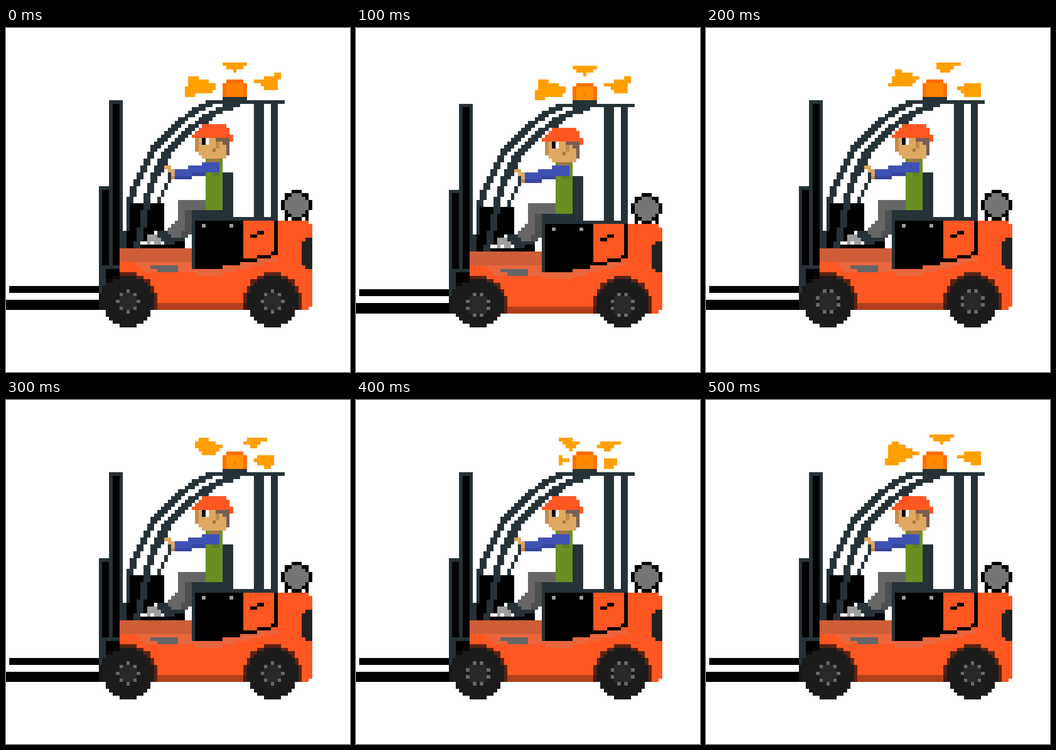
These frames come from a looping animation (748 by 748 pixels, 0.6 s). An HTML page with a canvas:

```html
<!DOCTYPE html>
<html lang="en">
<head>
<meta charset="utf-8">
<title>Forklift</title>
<style>
html, body { margin: 0; width: 100%; height: 100%; overflow: hidden; background: #fff; }
canvas { display: block; width: 100vw; height: 100vh; image-rendering: pixelated; }
</style>
</head>
<body>
<canvas id="stage" width="100" height="100"></canvas>
<script>
const ctx = document.getElementById('stage').getContext('2d');
const STEP = 100;
const SLATE = '#263238', BLACK = '#000', ORANGE = '#ff5722', SOFT = '#e9663d',
      SKIN = '#dfa862', SHADE = '#c08c4c', HAIR = '#795f50', BLUE = '#3f51b5',
      NAVY = '#36459c', GREY = '#666', DARK = '#4f4f4f', STEEL = '#9e9e9e',
      LAMP = '#ff6d00', GLOW = '#ffa000';
const AXLES = [35.5, 77.5], AXLE_Y = 79.5, TYRE = 7.5, GROUND = 82;

// Box given by its edges in grid cells.
function box(color, x0, y0, x1, y1) {
  ctx.fillStyle = color;
  ctx.fillRect(x0, y0, x1 - x0, y1 - y0);
}

// Polygon without smoothing: fills the cells whose centres lie inside.
function poly(color, ...p) {
  const n = p.length;
  for (let y = 0; y < 100; y++) {
    const cuts = [], mid = y + 0.5;
    for (let i = 0; i < n; i += 2) {
      const [xa, ya, xb, yb] = [p[i], p[i + 1], p[(i + 2) % n], p[(i + 3) % n]];
      if ((ya <= mid) !== (yb <= mid)) cuts.push(xa + (xb - xa) * (mid - ya) / (yb - ya));
    }
    cuts.sort((a, b) => a - b);
    for (let i = 0; i + 1 < cuts.length; i += 2) {
      box(color, Math.ceil(cuts[i] - 0.5), y, Math.ceil(cuts[i + 1] - 0.5), y + 1);
    }
  }
}

function disc(color, cx, cy, rx, ry = rx, yMax = 100) {
  for (let y = Math.floor(cy - ry); y < Math.min(cy + ry, yMax); y++) {
    const d = (y + 0.5 - cy) / ry;
    if (Math.abs(d) >= 1) continue;
    const half = Math.floor(rx * Math.sqrt(1 - d * d)) + 0.5;
    box(color, cx - half, y, cx + half, y + 1);
  }
}

// Stepped rail through [row, left edge] points.
function rail(points, width) {
  for (let i = 1; i < points.length; i++) {
    const [ya, xa] = points[i - 1], [yb, xb] = points[i];
    for (let y = ya; y < yb; y++) {
      const x = Math.ceil(xa + (xb - xa) * (y - ya) / (yb - ya));
      box(SLATE, x, y, x + width(y), y + 1);
    }
  }
}

const ray = (...p) => poly(GLOW, ...p);
const topRay = x => ray(x - 4, 10, x + 4, 10, x, 13.2);

function beamFront() {
  topRay(66.5);
  ray(53.5, 13.5, 62, 16.8, 59.5, 19, 51.5, 20);
  ray(80.4, 12.8, 78.6, 18, 76.4, 18, 71.6, 15.5);
}
function beamRight() {
  ray(66.8, 10, 74.6, 10, 70.2, 13, 67.8, 13);
  ray(55.5, 11.8, 62.5, 14.3, 60, 17, 52.8, 17);
  ray(76.5, 15.8, 80, 15.8, 80, 20, 76, 20, 72.6, 17.5);
}
function beamSide() {
  ray(70.5, 10.6, 76.6, 10.8, 72, 14, 69, 12.7);
  ray(57, 10.3, 63.3, 13.4, 61, 16, 57, 16, 54.6, 13.5);
  ray(75, 15.6, 77.5, 16, 78, 18.8, 75.5, 20, 71.8, 17.4);
}
function beamBack() {
  ray(58.8, 11, 61.5, 11, 65.4, 12.5, 62.3, 15);
  ray(59, 15.8, 62.5, 17.5, 59, 19.2);
  ray(71.5, 11.8, 77.6, 12, 73, 15, 69.5, 13.4);
  ray(72, 17, 76.2, 17, 75, 20, 72, 20);
}
function beamLeft() {
  topRay(68.5);
  ray(54, 11.7, 61.7, 15.6, 55, 19.2, 51.8, 19);
  ray(76.5, 14.8, 80, 14.8, 80, 19, 78, 19, 72.6, 16.5);
}

const POSES = [
  { beam: beamFront, lamp: '#ff7f00', drop: 0, turned: false },
  { beam: beamFront, lamp: '#ff8f00', drop: 1, turned: true },
  { beam: beamRight, lamp: '#ff8400', drop: 0, turned: true },
  { beam: beamSide, lamp: '#ff9600', drop: 0, turned: false },
  { beam: beamBack, lamp: '#ff8a00', drop: 0, turned: true },
  { beam: beamLeft, lamp: '#ff8a00', drop: 0, turned: false }
];

function beacon(lamp) {
  box(LAMP, 64, 15, 69, 16);
  box(LAMP, 63, 16, 70, 20);
  box(lamp, 64, 16, 69, 20);
  box('#ff7d00', 66, 18, 67, 19);
  box(SLATE, 63, 20, 70, 21);
}

function mast() {
  box(BLACK, 1, 75, 27, 77);
  box(BLACK, 0, 79, 27, GROUND);
  box(SLATE, 27, 46, 33, GROUND);
  box(SLATE, 30, 21, 34, 64);
  box(BLACK, 28, 47, 30, 69);
  box(BLACK, 31, 22, 33, 69);
  box(BLACK, 29, 70, 33, 74);
}

function cab() {
  poly(BLACK, 36, 51, 46, 51, 46, 59, 44, 59, 41, 62, 36, 62);
  box(SLATE, 33, 59, 35, 64);
  box(BLACK, 35, 59, 37, 64);
  box(BLACK, 39, 63, 52, 64);
  box(SLATE, 58, 21, 81, 22);
  box(SLATE, 72, 22, 75, 55);
  box(SLATE, 77, 22, 79, 56);
  rail([[21, 58], [23, 54], [25, 52], [26, 50], [34, 42], [46, 36], [49, 35], [59, 35]],
    y => y < 24 ? 4 : y < 35 ? 3 : y < 51 ? 2 : 1);
  rail([[22, 63], [25, 57], [28, 53], [36, 45], [42, 42], [48, 40], [64, 36.5]],
    y => y < 24 ? 5 : y < 28 ? 4 : y < 43 ? 3 : 2);
  box(SLATE, 63, 42, 66, 55);
  box(SLATE, 54, 53, 66, 56);
  box(SLATE, 66, 55, 79, 56);
}

function driver() {
  poly(STEEL, 42, 60, 44, 60, 45, 61, 45, 63, 41, 63, 41, 61);
  box('#fff', 42, 62, 43, 63);
  poly(GREY, 51, 50, 59, 50, 59, 53, 54, 53, 54, 58, 52, 61, 47, 61, 47, 59, 50, 56, 50, 51);
  poly(DARK, 52, 53, 54, 53, 54, 59, 53, 61, 51, 61, 52, 58);
  poly(SLATE, 44, 59, 47, 59, 48, 61, 52, 61, 52, 62, 50, 63, 46, 63, 44, 60);
  box(BLACK, 49, 62, 52, 63);

  box('#6b8e23', 58, 38, 63, 53);
  box('#5f7f20', 60, 42, 62, 43);
  box(BLUE, 57, 39, 62, 42);
  box(BLUE, 53, 40, 57, 42);
  box(BLUE, 49, 41, 58, 43);
  box(NAVY, 54, 42, 58, 43);
  box(NAVY, 49, 43, 54, 44);
  poly(SKIN, 46, 40, 48, 40, 49, 41, 49, 43, 46, 41);
  box(SHADE, 48, 43, 49, 44);
  box(SLATE, 47, 42, 48, 45);
  for (let i = 0; i < 3; i++) box(SLATE, 46 - i, 45 + 2 * i, 47 - i, 47 + 2 * i);

  box('#9c774c', 59, 38, 62, 39);
  poly(SKIN, 55, 32, 65, 32, 65, 36, 64, 38, 57, 38, 55.2, 36);
  poly(HAIR, 60, 32, 65, 32, 65, 37, 64, 37, 64, 34);
  box(SHADE, 55, 32, 56, 36);
  box(SHADE, 61, 33, 62, 35);
  box('#a9783f', 60, 35, 61, 36);
  box(BLACK, 57, 32, 58, 34);
  box('#fff', 58, 32, 59, 34);
  poly(ORANGE, 57.4, 28, 64, 28, 65, 29, 65, 31, 66, 31, 66, 33, 65, 33, 65, 32, 54, 32, 54, 31);
}

function tank() {
  for (const x of [81, 87]) box(BLACK, x, 54, x + 1, 56);
  disc(BLACK, 84.5, 51.5, 4.3);
  disc('#757575', 84.5, 51.5, 3.3);
}

function body() {
  box(ORANGE, 33, 64, 89, GROUND);
  box('#fff', 78, 64, 88, 64);
  box(ORANGE, 69, 57, 89, 64);
  box(ORANGE, 69, 56, 88, 57);
  box('#fff', 88, 81, 89, 82);
  for (let i = 0; i < 4; i++) box(SOFT, 37 + i, 67 + i, 79 - 4 * i, 68 + i);
  box(SOFT, 55, 71, 63, 72);
  box('#cf5d38', 33, 64, 54, 68);
  box(SLATE, 54, 56, 55, 70);
  box(GREY, 42, 69, 50, 70);
  box(GREY, 44, 70, 50, 71);
  box('#b23f1b', 44, 80, 70, GROUND);

  // Engine cover and the panel seam
  box(ORANGE, 69, 64, 78, 67);
  box(BLACK, 55, 56, 69, 67);
  for (let i = 0; i < 3; i++) box(BLACK, 55, 67 + i, 73 - 5 * i, 68 + i);
  box(BLACK, 78, 56, 79, 66);
  box(BLACK, 77, 65, 78, 66);
  box(BLACK, 73, 66, 77, 67);
  for (const x of [57, 65]) box(STEEL, x, 57, x + 1, 58);
  for (let i = 0; i < 2; i++) box(BLACK, 73 - 2 * i, 59 + i, 75 - 2 * i, 60 + i);

  box('#212121', 87, 61, 89, 70);
  box('#212121', 86, 62, 89, 69);
  for (const x of AXLES) disc('rgba(20,14,12,.7)', x, AXLE_Y, TYRE + 1, TYRE + 1, GROUND);
}

// The tyre stays on the ground and flattens as the truck drops.
function wheel(cx, drop, turned) {
  const hub = AXLE_Y + drop;
  disc('#1b1b1b', cx, AXLE_Y + drop / 2, TYRE, TYRE - drop / 2);
  disc('#292929', cx, hub, 2.9);
  for (let i = 0; i < 8; i++) {
    const a = (i + (turned ? 0.5 : 0)) * Math.PI / 4;
    const x = cx - 0.5 + Math.round(3.1 * Math.cos(a)), y = hub - 0.5 + Math.round(3.1 * Math.sin(a));
    box('#686868', x, y, x + 1, y + 1);
  }
}

function draw({ beam, lamp, drop, turned }) {
  box('#fff', 0, 0, 100, 100);
  ctx.save();
  ctx.translate(0, drop);
  beam();
  mast();
  cab();
  beacon(lamp);
  driver();
  tank();
  body();
  ctx.restore();
  for (const x of AXLES) wheel(x, drop, turned);
}

const start = performance.now();
function tick() {
  const t = performance.now() - start;
  draw(POSES[Math.floor(t / STEP) % POSES.length]);
  requestAnimationFrame(tick);
}
tick();
</script>
</body>
</html>
```
